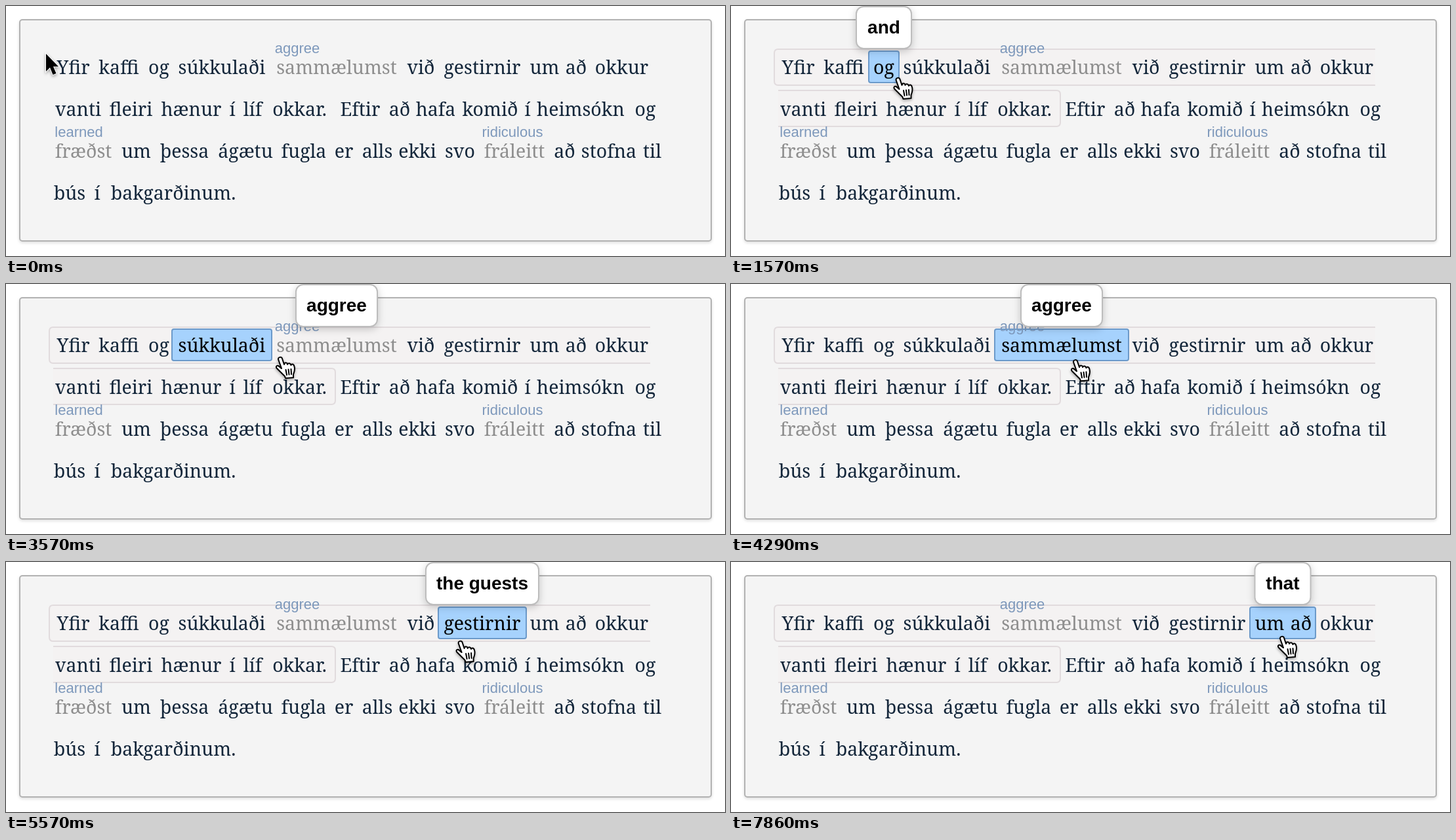
Animation of 1096x382 px, one loop 8000 ms. Source, as an HTML page:

```html
<!DOCTYPE html>
<html lang="is">
<head>
<meta charset="utf-8">
<title>Reading with word hints</title>
<style>
  html, body { margin: 0; width: 100%; height: 100%; overflow: hidden; background: #fff; }
  svg { display: block; width: 1096px; height: 382px; }
  text { text-anchor: middle; }
  .word { font: 28.5px "Noto Serif", serif; fill: #13263a; }
  .known { fill: #8e8e8e; }
  .lit { fill: #000; }
  .label { font: 22px "Liberation Sans", sans-serif; fill: #7d98bb; }
  #tipText { font: bold 28px "Liberation Sans", sans-serif; }
  #panel { fill: #f4f4f4; stroke: #b2b2b2; stroke-width: 2; filter: drop-shadow(0 2px 2px #0002); }
  #sentence { fill: #f4f2f2; stroke: #e1dbdd; stroke-width: 2; }
  #mark { fill: #a6d2fd; stroke: #6c9aca; stroke-width: 2; }
  #tipBox { fill: #fff; stroke: #bdbdbd; stroke-width: 2; filter: drop-shadow(0 3px 6px #0003); }
  #cursor { filter: drop-shadow(0 2px 2px #0005); }
  #hand { fill: #fff; stroke: #000; stroke-width: 2; stroke-linejoin: round; stroke-linecap: round; }
  #arrow { stroke: #fff; stroke-width: 2; paint-order: stroke; }
</style>
</head>
<body>
<svg viewBox="0 0 1096 382">
  <rect id="panel" x="21" y="21" width="1054" height="338" rx="4"/>
  <g id="sentence">
    <path d="M982 66H72Q66 66 66 72V115Q66 121 72 121H982"/>
    <path d="M72 129H496Q502 129 502 135V178Q502 184 496 184H72"/>
  </g>
  <rect id="mark" y="69" height="48" rx="3"/>
  <g id="words"></g>
  <g id="tip">
    <rect id="tipBox" y="1" height="64" rx="11"/>
    <text id="tipText" y="42"></text>
  </g>
  <g id="cursor">
    <path id="arrow" d="M0 0V27L6 21L10.500 32L15.500 30L11 19.500H19Z"/>
    <g id="hand">
      <path d="M4 4C4 0 9 0 10 3L13 12C14 8 18 9 18 12C19 9 23 10 23.500 13C25 10 28 12 28.500 15C30 21 28 24 27 27V32L15 33L14 30C10 26 6 22 2 18C0 16 1 13 4 14C6 15 7 17 9 18Z"/>
      <path d="M15.500 20L17 28M19.500 19.500L20.500 27.500M23.500 19L24 27"/>
    </g>
  </g>
</svg>
<script>
const $ = id => document.getElementById(id);
const LOOP = 8000, STEPS_PER_MS = 0.007;

// Each line: baseline, words, word centres.
const lines = [
  [104, "Yfir kaffi og súkkulaði sammælumst við gestirnir um að okkur",
    [102.5, 172, 233, 329, 504, 632.5, 726, 821, 869, 938.5]],
  [168, "vanti fleiri hænur í líf okkar. Eftir að hafa komið í heimsókn og",
    [110, 190.5, 282.5, 345, 376, 447.5, 540, 600, 655, 738, 795, 876, 974.5]],
  [232, "fræðst um þessa ágætu fugla er alls ekki svo fráleitt að stofna til",
    [118, 198.5, 272, 365, 454, 515, 566, 627, 692, 775, 851.5, 919, 985]],
  [296, "bús í bakgarðinum.", [97, 139, 255]],
];
const known = ["sammælumst", "fræðst", "fráleitt"];
const labels = [["aggree", 444, 72], ["learned", 111, 200], ["ridiculous", 772, 200]];

// Hint shown from a step on: step, hint, hint width, left and right of its mark, marked words.
const hints = [
  [2, "Over", 100, 69, 135, [0]],
  [5, "coffee", 114, 134, 210, [1]],
  [9, "and", 84, 210, 256, [2]],
  [12, "chocolate", 162, 253, 405, [3]],
  [25, "aggree", 124, 402, 606, [4]],
  [34, "us", 64, 605, 661, [5]],
  [38, "the guests", 172, 659, 793, [6]],
  [47, "that", 85, 791, 891, [7, 8]],
];

// Cursor track: step, x, y.
const track = [
  [0, 61, 73], [2, 88, 86], [5, 151, 100], [8, 190, 104], [10, 230, 108], [12, 265, 110],
  [14, 294, 110], [16, 307, 109], [19, 307, 109], [20, 314, 110], [25, 411, 111],
  [27, 449, 113], [31, 541, 116], [35, 628, 116], [40, 700, 121], [45, 764, 114],
  [48, 797, 114], [51, 820, 113], [53, 828, 113], [54, 828, 113], [55, 833, 113],
];

function addText(content, x, y, className) {
  const node = document.createElementNS("http://www.w3.org/2000/svg", "text");
  node.textContent = content;
  node.setAttribute("x", x);
  node.setAttribute("y", y);
  node.setAttribute("class", className);
  return $("words").appendChild(node);
}

const wordNodes = lines.flatMap(([y, words, centres]) => words.split(" ").map((word, i) =>
  addText(word, centres[i], y, known.includes(word) ? "word known" : "word")));
labels.forEach(([content, x, y]) => addText(content, x, y, "label"));

const hintAt = step => hints.findLast(hint => hint[0] <= step);
const show = (id, visible) => $(id).style.display = visible ? "" : "none";

function placeRect(id, left, right) {
  $(id).setAttribute("x", left);
  $(id).setAttribute("width", right - left);
}

function cursorAt(step) {
  const next = track.findIndex(key => key[0] >= step);
  const [k1, x1, y1] = track[next], [k0, x0, y0] = track[Math.max(0, next - 1)];
  const part = k1 > k0 ? (step - k0) / (k1 - k0) : 0;
  return [x0 + (x1 - x0) * part, y0 + (y1 - y0) * part];
}

function draw(step) {
  const hint = hintAt(step), marked = hintAt(step - 1);
  show("sentence", hint);
  show("tip", hint);
  show("mark", marked);
  show("arrow", step === 0);
  show("hand", step > 0);
  if (hint) {
    const [, content, width, left, right] = hint, middle = (left + right) / 2;
    placeRect("tipBox", middle - width / 2, middle + width / 2);
    $("tipText").setAttribute("x", middle);
    $("tipText").textContent = content;
  }
  if (marked) placeRect("mark", marked[3], marked[4]);
  wordNodes.forEach((node, i) =>
    node.classList.toggle("lit", Boolean(marked && marked[5].includes(i))));
  $("cursor").setAttribute("transform", `translate(${cursorAt(step)})`);
}

let start;
function tick(now) {
  start ??= now;
  // Steps begin on whole hundredths of a second, slightly early.
  const step = Math.floor((now - start) % LOOP * STEPS_PER_MS + 0.07);
  draw(Math.min(step, 55));
  requestAnimationFrame(tick);
}
draw(0);
requestAnimationFrame(tick);
</script>
</body>
</html>
```
